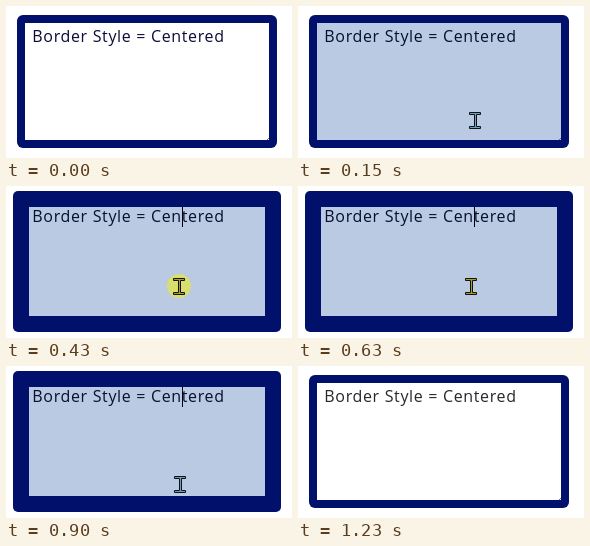
Write an HTML page that moves like this. It is 286 px wide and 152 px high and loops after 2090 ms.

```html
<!DOCTYPE html>
<html lang="en">
<head>
<meta charset="utf-8">
<title>Border Style</title>
<style>
  html, body { margin: 0; width: 100%; height: 100%; overflow: hidden; background: #fff; }
  svg { display: block; width: 286px; height: 152px; }
  text { font: 16px "Open Sans", "Noto Sans", sans-serif; letter-spacing: .66px; }
</style>
</head>
<body>
<svg viewBox="0 0 286 152">
  <rect id="frame" fill="#00106b"/>
  <rect id="field"/>
  <path id="grip" d="M261 134L263 132" stroke="#6a7296"/>
  <text id="label" x="26.3" y="36">Border Style = Centered</text>
  <rect id="caret" x="176" y="21" width="1" height="20" fill="#000"/>
  <g id="pointer">
    <circle id="halo" r="12" fill="#d8df70"/>
    <path id="beam" stroke="#111" transform="translate(.5 .5)"
      d="M-6-8H5V-6H1V6H5V8H-6V6H-1V-6H-6Z"/>
  </g>
</svg>
<script>
const LOOP = 2090;
const WHITE = "#fff", HOVER = "#bacae2", BLUE = "#6f9fc4", GOLD = "#a9a022";

// thick: focused border; at: pointer centre; halo: click highlight
const steps = [
  { t: 0, fill: WHITE, ink: "#0c0c38" },
  { t: 70, fill: HOVER, at: [180, 125], beam: BLUE },
  { t: 150, fill: HOVER, at: [177, 114], beam: BLUE },
  { t: 220, fill: HOVER, at: [174, 104], beam: BLUE },
  { t: 290, fill: HOVER, at: [173, 100], beam: BLUE },
  { t: 360, fill: HOVER, at: [173, 100], beam: GOLD },
  { t: 430, fill: HOVER, at: [173, 100], beam: GOLD, thick: true, halo: true },
  { t: 630, fill: HOVER, at: [173, 100], beam: GOLD, thick: true },
  { t: 830, fill: HOVER, at: [173, 102], beam: GOLD, thick: true },
  { t: 900, fill: HOVER, at: [174, 118], beam: BLUE, thick: true },
  { t: 970, fill: WHITE, ink: "#2a262e", thick: true },
  { t: 1230, fill: WHITE, ink: "#2a262e" }
];

const $ = id => document.getElementById(id);
const set = (id, attrs) => {
  for (const key in attrs) $(id).setAttribute(key, attrs[key]);
};
const show = (id, on) => set(id, { visibility: on ? "inherit" : "hidden" });

// The border grows equally to both sides of a fixed centre line.
function box(id, grow, extra) {
  set(id, {
    x: 15 - grow, y: 13 - grow,
    width: 252 + 2 * grow, height: 125 + 2 * grow, ...extra
  });
}

function draw(s) {
  const half = s.thick ? 8 : 4;
  box("frame", half, { rx: s.thick ? 5 : 6 });
  box("field", -half, { fill: s.fill });
  set("label", { fill: s.ink || "#061030" });
  show("grip", !s.thick);
  show("caret", s.thick && s.at);
  set("pointer", { visibility: s.at ? "visible" : "hidden" });
  if (s.at) {
    set("pointer", { transform: `translate(${s.at})` });
    set("beam", { fill: s.beam });
  }
  show("halo", s.halo);
}

const start = performance.now();
let current;

function tick() {
  const t = (performance.now() - start) % LOOP;
  const step = steps.findLast(s => s.t <= t) || steps[0];
  if (step !== current) draw(current = step);
  requestAnimationFrame(tick);
}
tick();
</script>
</body>
</html>
```
